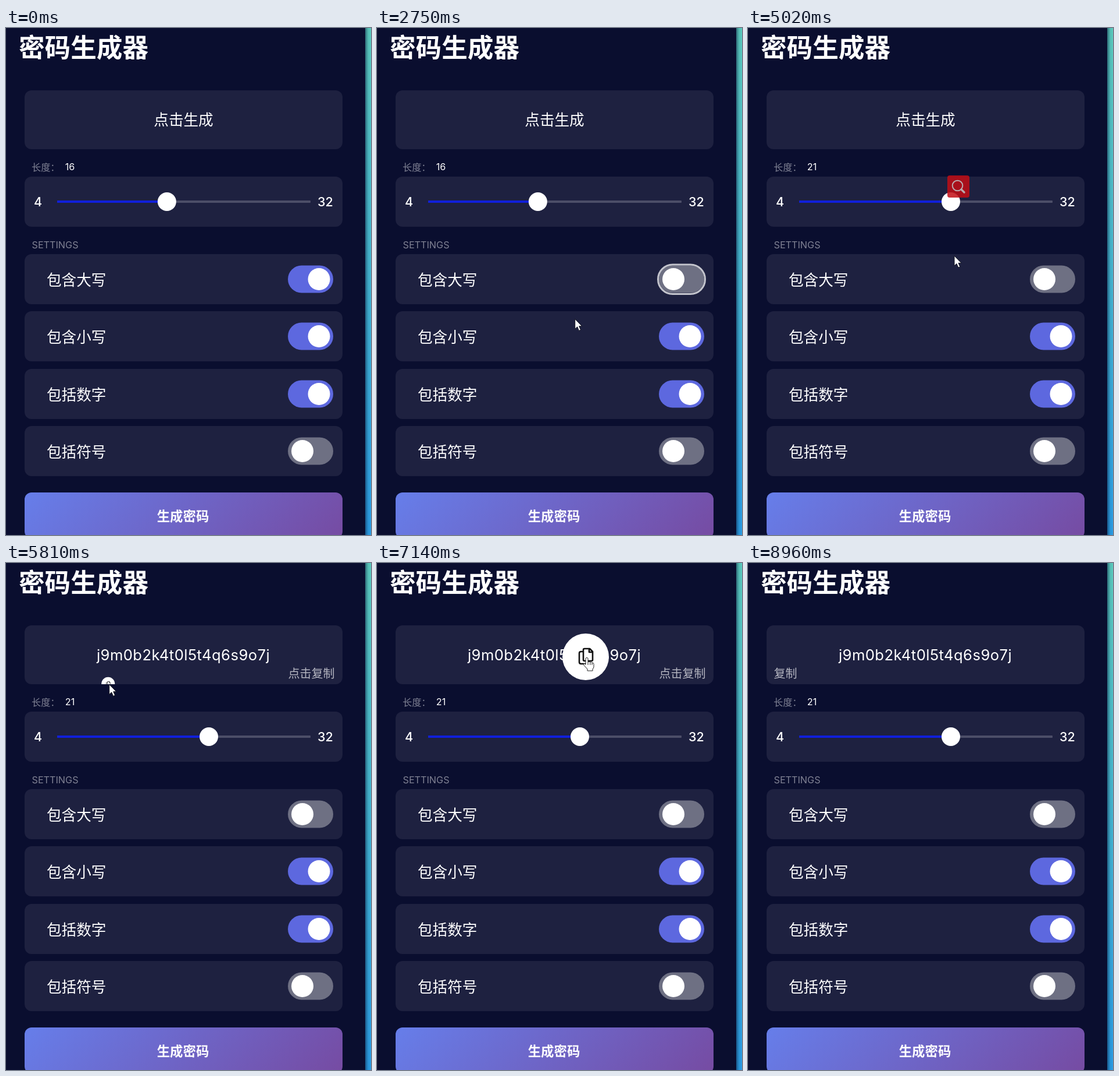
Recreate the animation shown at these times as an HTML page. Size 628x870 px, loop 9800 ms.

```html
<!DOCTYPE html>
<html lang="zh-CN">
<head>
<meta charset="utf-8">
<title>密码生成器</title>
<style>
  html, body { margin: 0; width: 100%; height: 100%; overflow: hidden; background: #0a0e2f; }
  svg { display: block; width: 628px; height: 870px; }
  text { font-family: Inter, "Noto Sans CJK SC", "Noto Sans CJK", sans-serif; font-size: 25.6px; fill: #fff; }
  .title { font-size: 44.6px; font-weight: 700; }
  .small { font-size: 16.2px; }
  .dim { fill: #7f8193; }
  .num { font-size: 21.5px; font-weight: 500; }
  .hint { font-size: 20px; font-weight: 300; fill: #b4b5c0; }
  .mid { text-anchor: middle; }
  .pass { letter-spacing: .45px; }
  .go { font-size: 22.4px; font-weight: 700; }
  .box { fill: #1e2140; }
</style>
</head>
<body>
<svg viewBox="0 0 628 870">
  <defs>
    <linearGradient id="violet" gradientUnits="userSpaceOnUse" x1="149" y1="680" x2="462" y2="993">
      <stop stop-color="#667eea"/><stop offset="1" stop-color="#764ba2"/>
    </linearGradient>
    <linearGradient id="sea" x2="0" y2="1">
      <stop stop-color="#5ccdbf"/><stop offset="1" stop-color="#2b9ee6"/>
    </linearGradient>
    <linearGradient id="shade">
      <stop stop-color="#0a1b3c" stop-opacity=".55"/><stop offset=".5" stop-color="#0a1b3c" stop-opacity=".1"/>
      <stop offset="1" stop-color="#0a1b3c" stop-opacity="0"/>
    </linearGradient>
    <clipPath id="clip"><rect x="32" y="107" width="547" height="101" rx="12"/></clipPath>
  </defs>

  <rect width="628" height="870" fill="#0a0e2f"/>
  <rect x="618" width="10" height="870" fill="url(#sea)"/>
  <rect x="618" width="10" height="870" fill="url(#shade)"/>
  <text class="title" x="22" y="49.5">密码生成器</text>

  <rect class="box" x="32" y="107" width="547" height="101" rx="12"/>
  <rect id="flash" x="32" y="107" width="547" height="101" fill="#31334f"/>
  <text id="prompt" class="mid" x="305.5" y="167">点击生成</text>
  <text id="pass" class="mid pass" x="305" y="167">j9m0b2k4t0l5t4q6s9o7j</text>
  <g clip-path="url(#clip)">
    <text id="copy" class="hint" x="485.5" y="196.5">点击复制</text>
    <text id="copied" class="hint" x="44.5" y="196.5">复制</text>
    <g id="bubble">
      <circle r="40" fill="#fff"/>
      <g fill="none" stroke="#111" stroke-width="2.6" stroke-linejoin="round">
        <path d="M-4-9H-8Q-11-9-11-6V9Q-11 12-8 12H3Q6 12 6 9V7"/>
        <path d="M-4-12Q-4-14-2-14H7L12-9V5Q12 7 10 7H-2Q-4 7-4 5ZM6-14V-8H12"/>
      </g>
    </g>
  </g>

  <text class="small dim" x="44" y="244.5">长度：</text>
  <text id="len" class="small mid" x="110" y="244">16</text>
  <rect class="box" x="32" y="255" width="547" height="86" rx="12"/>
  <text class="num" x="48" y="306">4</text>
  <text class="num" x="536" y="306">32</text>
  <rect x="88" y="296" width="436" height="4" rx="1" fill="#4c4e68"/>
  <rect id="fill" x="88" y="296" height="4" rx="1" fill="#101fdb"/>
  <circle id="thumb" cy="298"/>

  <text class="small dim" x="44.5" y="378">SETTINGS</text>
  <g id="rows"></g>

  <rect x="32" y="797" width="547" height="79" rx="12" fill="url(#violet)"/>
  <text class="go mid" x="304.5" y="845.5">生成密码</text>

  <g id="search">
    <rect x="343" y="253" width="38" height="38" rx="4" fill="#c20d14" fill-opacity=".85"/>
    <g fill="none" stroke="#b9a9ac" stroke-width="2">
      <circle cx="360.5" cy="270.5" r="8.8"/>
      <path d="M367 277L372 282" stroke-width="3.4" stroke-linecap="round"/>
    </g>
  </g>

  <g id="cursor">
    <circle id="press" r="15.5" fill="#efec2e" fill-opacity=".66"/>
    <path id="arrow" d="M0 0V17L4 13.4L6.8 20L9.8 18.7L7 12.3H12Z" fill="#fff" stroke="#10121f"/>
    <g id="hand" fill="#fff" stroke="#222" stroke-linejoin="round">
      <path d="M-2 1.5Q0-1 2 1.5V8Q4 6.3 5.8 8.2Q7.8 7 9 9.2Q11.8 8.6 12 11.5V16Q12 18 10 20V23H1V20L-5 13.5Q-6.5 10.5-4 10.5L-2 12.3Z"/>
      <path d="M2 8V13M5.8 8.5V13M9 9.5V13" fill="none"/>
    </g>
  </g>
</svg>

<script>
const LOOP = 9800, ENTER = 380, LEAVE = 8960;
const TOGGLED = 1500, GRABBED = 3400, DROPPED = 4360, MADE = 5330, COPIED = 7750;
const $ = id => document.getElementById(id);

// The pointer rests between legs; bend is how far a leg bows sideways
const entry = { x: 485, y: 864 };
const legs = [
  { from: ENTER, to: 990, x: 508, y: 422, bend: [50, 0] },
  { from: TOGGLED, to: 2470, x: 386, y: 718, bend: [45, 150] },
  { from: 2470, to: 3030, x: 270, y: 305, bend: [13, -11] },
  { from: 3770, to: 4230, x: 343, y: 304 },
  { from: DROPPED, to: 5020, x: 355, y: 391 },
  { from: 5020, to: 5230, x: 330, y: 841 },
  { from: 5360, to: 5890, x: 168, y: 168 },
  { from: 6120, to: 7050, x: 361, y: 162, bend: [39, 93] },
  { from: 7780, to: LEAVE, x: 392, y: 870, bend: [195, 204] }
];

const during = (t, a, b) => t >= a && t < b;
const ramp = (t, from, ms = 200) => {
  const p = Math.min(1, Math.max(0, (t - from) / ms));
  return p * p * (3 - 2 * p);
};
const show = (id, on) => $(id).setAttribute('visibility', on ? 'visible' : 'hidden');
const set = (el, attrs) => { for (const k in attrs) el.setAttribute(k, attrs[k]); };

function pointer(t) {
  let { x, y } = entry;
  for (const { from, to, x: tx, y: ty, bend = [0, 0] } of legs) {
    const u = ramp(t, from, to - from), bow = Math.sin(Math.PI * u);
    x += (tx - x) * u + bend[0] * bow;
    y += (ty - y) * u + bend[1] * bow;
  }
  return [x, y];
}

const rowTop = i => Math.round(388 + 98.4 * i);
const names = ['包含大写', '包含小写', '包括数字', '包括符号'];

function clickable(x, y) {
  const within = (l, top, w, h) => x >= l && x <= l + w && y >= top && y <= top + h;
  return within(32, 797, 547, 79) || within(88, 280, 436, 36) || within(32, 107, 547, 101)
    || names.some((_, i) => within(485, rowTop(i) + 19.5, 78, 47));
}

$('rows').innerHTML = names.map((name, i) => {
  const y = rowTop(i), on = i < 3;
  return `<rect class="box" x="32" y="${y}" width="547" height="86" rx="12"/>
    <text x="70" y="${y + 54}">${name}</text>
    <rect class="track" x="485" y="${y + 19.5}" width="78" height="47" rx="23.5" fill="${on ? '#5d68df' : '#6e7083'}"/>
    <circle class="knob" cx="${on ? 538.5 : 510}" cy="${y + 43}" r="19" fill="#fff"/>`;
}).join('') + '<rect id="ring" x="483.5" y="406" width="81" height="50.5" rx="25.2" fill="none" stroke="#c4c5cd" stroke-width="3"/>';
const track = document.querySelector('.track'), knob = document.querySelector('.knob');

function hint(id, amount) {
  set($(id), { opacity: amount, transform: `translate(0 ${50 * (1 - amount)})` });
}

function draw(t) {
  const [x, y] = pointer(t);
  const hand = clickable(x, y);
  const held = during(t, GRABBED, DROPPED), copying = during(t, 7560, COPIED);
  const pressed = held || copying || during(t, 1350, TOGGLED) || during(t, 5230, MADE);
  show('cursor', during(t, ENTER, LEAVE));
  set($('cursor'), { transform: `translate(${x} ${y})` });
  $('hand').style.display = hand ? '' : 'none';
  $('arrow').style.display = hand ? 'none' : '';
  $('press').style.display = pressed ? '' : 'none';

  const off = ramp(t, TOGGLED);
  set(track, { fill: `color-mix(in srgb, #6e7083 ${off * 100}%, #5d68df)` });
  track.style.fill = track.getAttribute('fill');
  set(knob, { cx: 538.5 - 28.5 * off });
  show('ring', during(t, TOGGLED, GRABBED));

  const value = 16 + Math.round(5 * ramp(t, 3770, 460));
  const cx = 103.7 + (value - 4) / 28 * 404;
  $('len').textContent = value;
  set($('fill'), { width: cx - 88 });
  set($('thumb'), { cx, r: held ? 19 : 16, fill: held ? '#d4d3da' : '#fff' });
  show('search', during(t, DROPPED + 90, MADE + 50));

  show('prompt', t < MADE);
  show('pass', t >= MADE);
  show('flash', copying);
  hint('copy', ramp(t, MADE) * (1 - ramp(t, COPIED)));
  hint('copied', ramp(t, COPIED));

  const size = Math.max(
    ramp(t, 5740) * (1 - ramp(t, 6420)),
    ramp(t, 6830) * (1 - ramp(t, 7830)));
  show('bubble', size > 0);
  set($('bubble'), { transform: `translate(${x - 2} ${y - 1}) scale(${size})` });
}

function tick() {
  draw(performance.now() % LOOP);
  requestAnimationFrame(tick);
}
tick();
</script>
</body>
</html>
```
